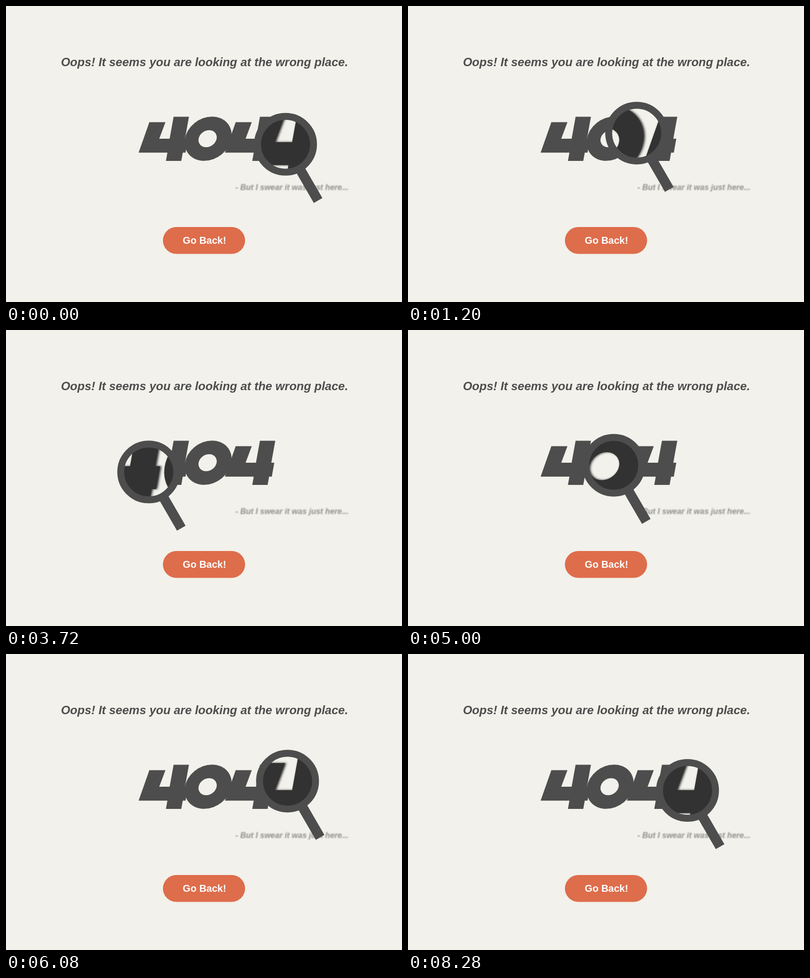
Write an HTML page that moves like this. It is 800 px wide and 600 px high and loops after 8.32 s.

```html
<!DOCTYPE html>
<html lang="en">
<head>
<meta charset="utf-8">
<title>404</title>
<style>
  html, body { margin: 0; width: 100%; height: 100%; overflow: hidden; background: #f2f1eb; }
  svg { display: block; width: 800px; height: 600px; }
  text { font-family: "Liberation Sans", Helvetica, Arial, sans-serif; font-weight: bold; }
  .say { font-style: italic; fill: #4d4d4d; }
  .hint { opacity: .6; filter: blur(1px); }
</style>
</head>
<body>
<svg viewBox="0 0 800 600">
  <defs>
    <!-- Both digits sit on the crossbar's top edge (y = 0) -->
    <path id="four" d="M-41-33.4H-8.5L-21 0H0L8-44.6H39L31 0H37L32 28.2H26.5L23.5 45H-7.5L-4.5 28.2H-62.7Z"/>
    <path id="zero" fill-rule="evenodd" transform="skewX(-10.15)"
      d="M-46.8 0a46.8 44.8 0 1 0 93.6 0a46.8 44.8 0 1 0-93.6 0Z
         M-19.2 0a18.2 17.2 0 1 0 36.4 0a18.2 17.2 0 1 0-36.4 0Z"/>
    <clipPath id="glass"><circle id="hole" r="51"/></clipPath>
    <filter id="soft" x="-10%" y="-20%" width="120%" height="140%">
      <feDropShadow dx="2.6" dy="0" stdDeviation="1.9" flood-color="#323232" flood-opacity=".95"/>
    </filter>
  </defs>

  <text class="say" x="401" y="122" font-size="24" text-anchor="middle">Oops! It seems you are looking at the wrong place.</text>
  <text class="say hint" x="692" y="373" font-size="16" text-anchor="end">- But I swear it was just here...</text>

  <rect x="317" y="448" width="166" height="54.5" rx="27.25" fill="#de6d4b"/>
  <text x="401" y="482" font-size="20" fill="#fff" text-anchor="middle">Go Back!</text>

  <g fill="#4d4d4d">
    <use href="#four" x="330.6" y="269"/>
    <use href="#zero" x="408.3" y="269"/>
    <use href="#four" x="505" y="269"/>
  </g>

  <g clip-path="url(#glass)">
    <rect width="800" height="600" fill="#f2f1eb"/>
    <g fill="#323232" filter="url(#soft)">
      <use href="#four" transform="translate(250.5 276) scale(1.65)"/>
      <use href="#zero" transform="translate(398 276) scale(1.65)"/>
      <use href="#four" transform="translate(578 276) scale(1.65)"/>
    </g>
  </g>

  <g id="loupe">
    <circle r="56.5" fill="none" stroke="#4d4d4d" stroke-width="14"/>
    <rect x="56" y="-10" width="75.6" height="20" fill="#4d4d4d" transform="rotate(60)"/>
  </g>
</svg>
<script>
  const LOOP = 8320, STEP = 40;
  const WINDUP = 240, PULL = 4;   // short draw back before each move, ms and px
  const HOME = { x: 564.7, y: 280.3 };

  // Each leg winds up, glides to a stop, then swings back a little before resting
  const legs = [
    { start: 0,    arrive: 840,  rest: 1200, x: 462,   y: 257.7, pace: 1,   sag: 0 },
    { start: 2120, arrive: 2960, rest: 3720, x: 288.3, y: 287.8, pace: 1,   sag: 3 },
    { start: 4600, arrive: 6240, rest: 6440, x: 570.7, y: 257.5, pace: .45, sag: 0 },
    { start: 7280, arrive: 8000, rest: 8280, x: 564.7, y: 276.5, pace: 1,   sag: 0 }
  ];

  const part = (t, a, b) => Math.min(1, Math.max(0, (t - a) / (b - a)));
  const arch = u => Math.sin(Math.PI * u);
  const ease = u => u * u * (3 - 2 * u);

  function lens(t) {
    const i = legs.findLastIndex(leg => leg.start <= t);
    const from = legs[i - 1] ?? HOME, to = legs[i];
    const u = part(t, to.start + WINDUP / 2, to.arrive) ** to.pace;
    const back = PULL * arch(part(t, to.start, to.start + WINDUP))
      + (to.rest - to.arrive) / 100 * arch(part(t, to.arrive, to.rest));
    const glide = k => from[k] + (to[k] - from[k]) * ease(u) - Math.sign(to[k] - from[k]) * back;
    return [glide('x'), glide('y') + to.sag * arch(u)];
  }

  const movers = ['hole', 'loupe'].map(id => document.getElementById(id));

  function draw(ms) {
    const t = Math.floor((ms + 1) % LOOP / STEP) * STEP;
    const [x, y] = lens(t);
    for (const el of movers) el.setAttribute('transform', `translate(${x} ${y})`);
  }

  let begin;
  function tick(now) {
    begin ??= now;
    draw(now - begin);
    requestAnimationFrame(tick);
  }
  draw(0);
  requestAnimationFrame(tick);
</script>
</body>
</html>
```
